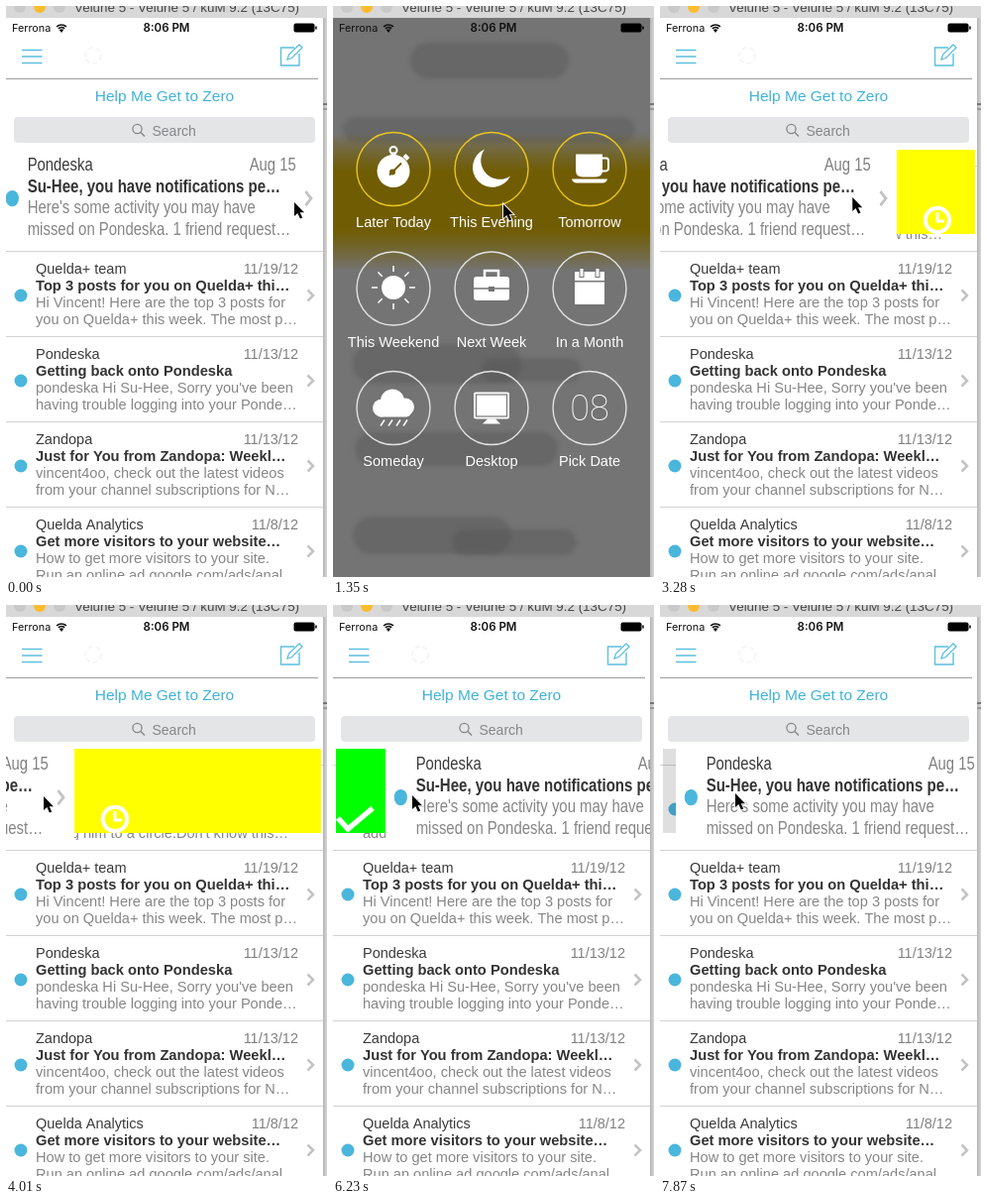
An HTML page with a canvas that plays this animation: 324x576 px, repeating every 8000 ms.

```html
<!DOCTYPE html>
<html lang="en">
<head>
<meta charset="utf-8">
<title>Mail swipe</title>
<style>
html, body { margin: 0; width: 100%; height: 100%; overflow: hidden; background: #fff; }
canvas { display: block; width: 324px; height: 576px; }
</style>
</head>
<body>
<canvas id="stage" width="324" height="576"></canvas>
<script>
const c = document.getElementById('stage').getContext('2d');
const LOOP = 8000, STEP = 148.2;
const BLUE = '#4ab6dc', ICON_BLUE = '#5bbfe0', W = '#fff';
const SANS = '"Liberation Sans", Arial, sans-serif', UI = 'Inter, sans-serif';

// Key points: [step, card offset] and [step, pointer x, pointer y]
const CARD = [[0, 0], [4, 0], [7, -130], [8, -130], [9, -319], [14, -319], [15, -75], [16, -18],
  [17, 0], [19, 0], [20, -12], [27, -250], [28, -264], [31, -284], [32, -284], [33, -270],
  [34, -130], [35, -36], [36, 0], [40, 0], [41, 20], [42, 62], [44, 190], [45, 215], [48, 0], [52, 0], [53, 25]];
const POINTER = [[0, 291, 198], [1, 302, 194], [2, 302, 194], [3, 303, 194], [4, 303, 194], [7, 172, 200],
  [9, 172, 200], [13, 226, 231], [15, 226, 231], [18, 288, 193], [19, 288, 193], [27, 38, 193],
  [31, 4, 191], [37, 4, 191], [39, 9, 193], [40, 9, 193], [42, 80, 192], [44, 208, 192],
  [45, 233, 192], [48, 20, 200], [50, 24, 192], [52, 24, 192], [53, 76, 190]];

const MAILS = [
  ['Quelda+ team', '11/19/12', 'Top 3 posts for you on Quelda+ thi…',
    'Hi Vincent! Here are the top 3 posts for', 'you on Quelda+ this week. The most p…'],
  ['Pondeska', '11/13/12', 'Getting back onto Pondeska',
    "pondeska Hi Su-Hee, Sorry you've been", 'having trouble logging into your Ponde…'],
  ['Zandopa', '11/13/12', 'Just for You from Zandopa: Weekl…',
    'vincent4oo, check out the latest videos', 'from your channel subscriptions for N…'],
  ['Quelda Analytics', '11/8/12', 'Get more visitors to your website…',
    'How to get more visitors to your site.', 'Run an online ad google.com/ads/anal…']];
const HIDDEN = ['Quelda+', '11/20/24', 'You have a new follower on Quelda…',
  'Follow and share with them right back by', "adding him to a circle.Don't know this…"];
const SWIPED = ['Pondeska', 'Aug 15', 'Su-Hee, you have notifications pe…',
  "Here's some activity you may have", 'missed on Pondeska. 1 friend request…'];

function at(keys, n) {
  const i = keys.findIndex(k => k[0] > n);
  if (i < 0) return keys[keys.length - 1].slice(1);
  const a = keys[i - 1], b = keys[i], f = (n - a[0]) / (b[0] - a[0]);
  return a.slice(1).map((v, j) => v + (b[j + 1] - v) * f);
}
function rect(x, y, w, h, color) {
  c.fillStyle = color;
  c.fillRect(x, y, w, h);
}
function round(x, y, w, h, r, color) {
  c.fillStyle = color;
  c.beginPath();
  c.roundRect(x, y, w, h, r);
  c.fill();
}
function disc(x, y, r, color) {
  c.fillStyle = color;
  c.beginPath();
  c.arc(x, y, r, 0, 7);
  c.fill();
}
function ring(x, y, r, color, width, from = 0, to = 7) {
  c.strokeStyle = color;
  c.lineWidth = width;
  c.beginPath();
  c.arc(x, y, r, from, to);
  c.stroke();
}
function stroke(path, color, width) {
  c.strokeStyle = color;
  c.lineWidth = width;
  c.stroke(new Path2D(path));
}
function fill(path, color) {
  c.fillStyle = color;
  c.fill(new Path2D(path));
}
function text(s, x, y, size, color, align = 'left', weight = 400, family = SANS) {
  c.font = `${weight} ${size}px ${family}`;
  c.textAlign = align;
  c.fillStyle = color;
  c.fillText(s, x, y);
}
function group(x, y, draw, sx = 1, sy = sx) {
  c.save();
  c.translate(x, y);
  c.scale(sx, sy);
  draw();
  c.restore();
}

function row([from, date, subject, ...body]) {
  disc(15, 45, 6.5, BLUE);
  text(from, 30, 23, 14.5, '#3a3a3a');
  text(date, 295, 23, 14.5, '#808080', 'right');
  text(subject, 30, 40, 14.7, '#333', 'left', 700);
  body.forEach((line, i) => text(line, 30, 57 + i * 17, 14.6, '#868686'));
  stroke('M304.5 39.5L310 45L304.5 50.5', '#c3c3c6', 2.5);
}

function windowFrame() {
  rect(0, 0, 324, 12, '#d8d8d8');
  [['#c9c9c9', 14], ['#fdbc2e', 34], ['#c9c9c9', 54]].forEach(([color, x]) => disc(x, 1, 6, color));
  text('Velune 5 - Velune 5 / kuM 9.2 (13C75)', 69, 6, 13.4, '#484848');
  const shadow = c.createLinearGradient(320, 0, 324, 0);
  shadow.addColorStop(0, '#b4b4b4');
  shadow.addColorStop(1, '#d6d6d6');
  rect(320, 12, 4, 564, shadow);
  rect(320, 98, 4, 2, '#777');
  rect(320, 103, 4, 2, '#999');
}

function statusBar() {
  text('Ferrona', 6, 26, 10.8, '#111', 'left', 400, UI);
  [7, 4.4].forEach(r => ring(56, 26, r, '#111', 1.7, -2.35, -0.8));
  fill('M56 27L53.8 24Q56 22.5 58.2 24Z', '#111');
  text('8:06 PM', 162, 26, 11.5, '#111', 'center', 600, UI);
  round(290.5, 17.5, 21, 9, 2, '#000');
  rect(312.2, 20.5, 1.5, 3, '#000');
}

function header() {
  rect(0, 12, 320, 126, W);
  statusBar();
  stroke('M16 44.5H36.5M16 51H36.5M16 57.5H36.5', ICON_BLUE, 1.3);
  c.setLineDash([5, 3]);
  ring(88, 50, 8, '#f5f5f5', 2);
  c.setLineDash([]);
  stroke('M291 42H277.5V60H296V48', ICON_BLUE, 1.4);
  stroke('M284 54L285.5 49L296 39L299 42L288.5 52.5Z', ICON_BLUE, 1.3);
  rect(0, 73, 315, 1, '#9c9c9c');
  text('Help Me Get to Zero', 160, 96, 15.5, '#3fb3d9', 'center');
  round(8, 112, 304, 26, 4, '#e4e5e7');
  ring(132.5, 124, 4.6, '#85868a', 1.3);
  stroke('M136 127.5L140 131.5', '#85868a', 1.5);
  text('Search', 147.5, 130.5, 14, '#85868a');
}

function actionPanel(d, n) {
  const size = Math.abs(d), returning = n >= 33 && n <= 36;
  const held = n >= 15 && n <= 17;
  if ((size < 60 && !held) || returning) {
    rect(3, 145, 315, 85, `rgba(0,0,0,${Math.min(size / 60, 1) * 0.3})`);
    return;
  }
  rect(3, 145, 315, 85, d > 0 ? '#0f0' : d < -260 ? '#b5834f' : '#ff0');
  if (held) return;
  if (d > 0) {
    const x = d - 40;
    stroke(`M${x - 17} 215L${x - 7} 226L${x + 18} 205`, W, 5.5);
  } else {
    const x = 360 + d;
    if (d < -260) {
      stroke(`M${x - 12} 208h24m-24 7h24m-24 7h24`, W, 3.5);
    } else {
      ring(x, 216, 12.2, W, 4);
      stroke(`M${x} 208V217H${x + 7}`, W, 3);
    }
  }
}

function inbox(d, n) {
  rect(0, 12, 320, 564, W);
  MAILS.forEach((mail, i) => {
    rect(0, 247 + i * 86, 320, 1, '#d2d2d4');
    group(0, 247 + i * 86, () => row(mail));
  });
  c.save();
  c.beginPath();
  c.rect(0, 138, 320, 99);
  c.clip();
  if (d) {
    rect(0, 161, 320, 1, '#d2d2d4');
    text('…', 293, 149, 14.6, '#868686', 'right');
    group(0, 161, () => row(HIDDEN));
    actionPanel(d, n);
  }
  // The swiped row is a slightly enlarged, taller copy of a list row.
  group(d - 9, 137.3, () => {
    rect(0, 0, 320.8, 79, W);
    row(SWIPED);
  }, 1.0226, 1.262);
  c.restore();
  header();
}

const ICONS = [
  ['Later Today', () => {
    disc(0, 3, 16.5, W);
    ring(0, -18, 3.5, W, 2);
    rect(-2.5, -16, 5, 4, W);
    stroke('M11 -13L15 -9', W, 4);
    stroke('M-4 7L8 -5', '#705c08', 2);
    disc(-1, 4, 3, '#705c08');
  }],
  ['This Evening', () => fill('M-7 -19A20 20 0 1 0 19 8A19 19 0 0 1 -7 -19Z', W)],
  ['Tomorrow', () => {
    fill('M-14 -14H13V2Q13 9 6 9H-7Q-14 9 -14 2Z', W);
    stroke('M13 -10H17Q19 -10 19 -7V0Q19 3 15 3H12', W, 2);
    fill('M-18 11H18Q17 15 13 15H-13Q-17 15 -18 11Z', W);
  }],
  ['This Weekend', () => {
    disc(0, 0, 12, W);
    for (let i = 0; i < 8; i++) {
      c.rotate(Math.PI / 4);
      stroke('M16 0H22', W, 1.5);
    }
  }],
  ['Next Week', () => {
    round(-18, -11, 36, 24, 3, W);
    stroke('M-7 -11V-17H7V-11', W, 2.5);
    stroke('M-18 1H-3M3 1H18', '#747474', 1.5);
    rect(-3, -1, 6, 5, '#747474');
  }],
  ['In a Month', () => {
    rect(-15, -16, 30, 33, W);
    rect(-15, -7, 30, 1.5, '#777');
    [-8, 8].forEach(x => {
      rect(x - 2.5, -18, 5, 8, '#747474');
      rect(x - 1.5, -19, 3, 8, W);
    });
  }],
  ['Someday', () => {
    disc(-12, 1, 9, W);
    disc(-1, -6, 12, W);
    disc(12, 0, 9, W);
    round(-18, -2, 36, 12, 5, W);
    stroke('M-9 13L-13 19M-1 13L-5 19M7 13L3 19M14 13L10 19', W, 1.5);
  }],
  ['Desktop', () => {
    round(-18, -15, 36, 27, 2, W);
    c.strokeStyle = '#777';
    c.lineWidth = 1.2;
    c.strokeRect(-15.5, -12.5, 31, 22);
    fill('M-4 12H4L9 17H-9Z', W);
  }],
  ['Pick Date', () => text('08', 0, 13, 36, W, 'center', 200, 'Roboto, sans-serif')]];

function blot(x, y, w, h) {
  c.filter = 'blur(2px)';
  round(x, y, w, h, Math.min(w, h) / 2, 'rgba(82,82,82,.38)');
  c.filter = 'none';
}

function laterScreen() {
  rect(0, 12, 320, 564, '#747474');
  blot(78, 37, 160, 36);
  blot(10, 112, 295, 26);
  blot(20, 341, 170, 40);
  blot(150, 355, 100, 24);
  blot(22, 430, 205, 34);
  blot(20, 515, 160, 38);
  blot(120, 528, 126, 26);
  const band = c.createLinearGradient(0, 128, 0, 268);
  [[0, 0], [0.14, 0.55], [0.28, 1], [0.7, 1], [0.86, 0.5], [1, 0]]
    .forEach(([p, a]) => band.addColorStop(p, `rgba(112,92,2,${a})`));
  rect(0, 128, 320, 140, band);
  statusBar();
  ICONS.forEach(([label, icon], i) => {
    const x = 61 + i % 3 * 99, y = 164.5 + Math.floor(i / 3) * 120.5;
    ring(x, y, 37, i < 3 ? '#e9c51c' : '#e2e2e2', 1.4);
    group(x, y - 1, icon);
    text(label, x, y + 58.5, 14.5, W, 'center');
  });
}

function pointer(x, y) {
  const arrow = new Path2D('M0 0V14L3.3 11L5.9 16.6L8.2 15.6L5.7 10.2H10Z');
  group(x, y, () => {
    c.strokeStyle = W;
    c.lineWidth = 1.8;
    c.stroke(arrow);
    c.fillStyle = '#000';
    c.fill(arrow);
  });
}

function frame() {
  const n = Math.floor(performance.now() % LOOP / STEP);
  const [d] = at(CARD, n);
  if (n >= 9 && n < 15) laterScreen();
  else inbox(d, n);
  windowFrame();
  pointer(...at(POINTER, n));
  requestAnimationFrame(frame);
}
frame();
</script>
</body>
</html>
```
